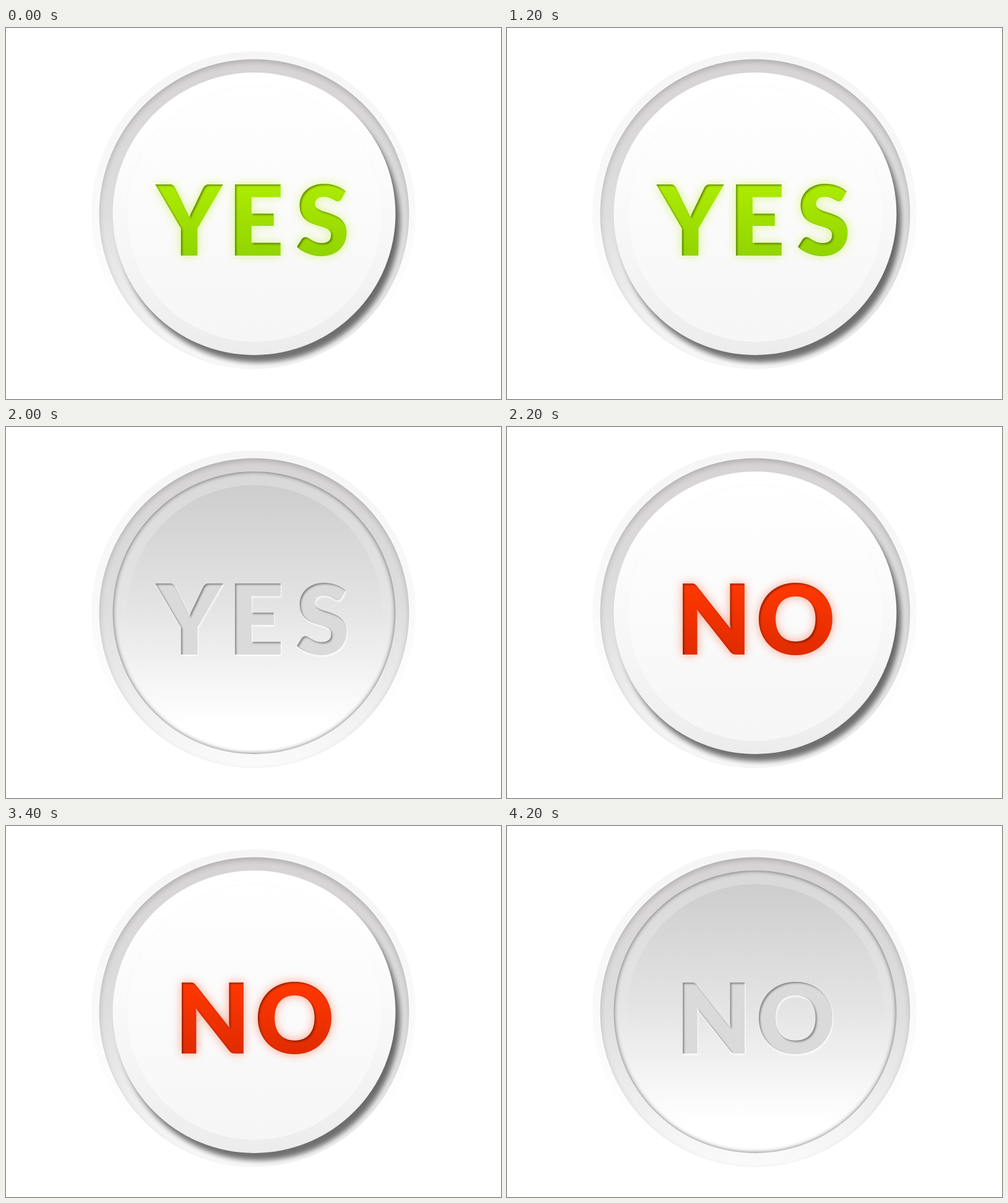
An HTML page that plays this animation: 800 px wide and 600 px high, repeating every 4400 ms.

```html
<!DOCTYPE html>
<html lang="en">
<head>
<meta charset="utf-8">
<title>Yes / No button</title>
<style>
  html, body { margin: 0; width: 100%; height: 100%; overflow: hidden; background: #fff; }
  svg { display: block; width: 100%; height: 100%; }
  text {
    font: 900 157px Lato, sans-serif;
    text-anchor: middle;
    fill: #dadada;
    filter: url(#carve) drop-shadow(1.5px 2px 1.5px #fff);
  }
  .YES:not(.pressed) text { fill: url(#green); filter: url(#carve) drop-shadow(0 0 8px #b4f00078); }
  .NO:not(.pressed) text { fill: url(#red); filter: url(#carve) drop-shadow(0 0 8px #ff360070); }
  .pressed .raised, svg:not(.pressed) .sunken { display: none; }
</style>
</head>
<body>
<svg id="button" class="YES" viewBox="0 0 800 600">
  <defs>
    <linearGradient id="halo" x2="0" y2="1">
      <stop stop-color="#f5f5f5"/><stop offset=".5" stop-color="#f9f9f9"/><stop offset=".85" stop-color="#fff"/>
    </linearGradient>
    <linearGradient id="groove" x2="0" y2="1">
      <stop stop-color="#d6d3d4"/><stop offset=".5" stop-color="#dedede"/><stop offset="1" stop-color="#fbfbfb"/>
    </linearGradient>
    <linearGradient id="rimUp" x2="0" y2="1">
      <stop offset=".15" stop-color="#fff"/><stop offset=".6" stop-color="#f7f7f7"/><stop offset="1" stop-color="#ececec"/>
    </linearGradient>
    <linearGradient id="plateUp" x2="0" y2="1">
      <stop stop-color="#fff"/><stop offset="1" stop-color="#f6f6f6"/>
    </linearGradient>
    <linearGradient id="rimDown" x2="0" y2="1">
      <stop stop-color="#d8d8d8"/><stop offset=".5" stop-color="#e6e6e6"/><stop offset=".9" stop-color="#fff"/>
    </linearGradient>
    <linearGradient id="plateDown" x2="0" y2="1">
      <stop stop-color="#cdcdcd"/><stop offset=".5" stop-color="#e5e5e5"/><stop offset=".92" stop-color="#fff"/>
    </linearGradient>
    <linearGradient id="green" gradientUnits="userSpaceOnUse" x1="0" x2="0" y1="255" y2="368">
      <stop stop-color="#aceb00"/><stop offset="1" stop-color="#92d400"/>
    </linearGradient>
    <linearGradient id="red" gradientUnits="userSpaceOnUse" x1="0" x2="0" y1="255" y2="368">
      <stop stop-color="#ff3800"/><stop offset="1" stop-color="#e02b00"/>
    </linearGradient>

    <!-- Inner shadows: the shape minus its own blurred, shifted copy. -->
    <filter id="carve" color-interpolation-filters="sRGB">
      <feOffset in="SourceAlpha" dx="1.5" dy="2"/>
      <feGaussianBlur stdDeviation="1.6" result="shifted"/>
      <feFlood flood-opacity=".4"/>
      <feComposite in2="SourceAlpha" operator="in"/>
      <feComposite in2="shifted" operator="out" result="shade"/>
      <feMerge><feMergeNode in="SourceGraphic"/><feMergeNode in="shade"/></feMerge>
    </filter>
    <filter id="sink" color-interpolation-filters="sRGB">
      <feOffset in="SourceAlpha" dy="4"/>
      <feGaussianBlur stdDeviation="4" result="shifted"/>
      <feFlood flood-opacity=".18"/>
      <feComposite in2="SourceAlpha" operator="in"/>
      <feComposite in2="shifted" operator="out" result="shade"/>
      <feMerge><feMergeNode in="SourceGraphic"/><feMergeNode in="shade"/></feMerge>
    </filter>
    <filter id="edge" color-interpolation-filters="sRGB">
      <feOffset in="SourceAlpha" dy="-.5"/>
      <feGaussianBlur stdDeviation="3.5" result="soft"/>
      <feFlood flood-opacity=".6"/>
      <feComposite in2="SourceAlpha" operator="in"/>
      <feComposite in2="soft" operator="out" result="shade"/>
      <feMerge><feMergeNode in="SourceGraphic"/><feMergeNode in="shade"/></feMerge>
    </filter>
    <filter id="blur"><feGaussianBlur stdDeviation="4.5"/></filter>
    <clipPath id="inGroove"><circle cx="401" cy="301" r="250"/></clipPath>
  </defs>

  <circle cx="400" cy="300" r="262" fill="url(#halo)"/>
  <circle cx="401" cy="301" r="251.5" fill="none" stroke="#fff" stroke-opacity=".3" stroke-width="2"/>
  <circle cx="401" cy="301" r="250.5" fill="url(#groove)" filter="url(#sink)"/>

  <g class="raised">
    <g clip-path="url(#inGroove)">
      <circle cx="408.5" cy="313" r="228" fill="#000" fill-opacity=".55" filter="url(#blur)"/>
    </g>
    <circle cx="401" cy="300.5" r="228.5" fill="url(#rimUp)"/>
    <circle cx="401.5" cy="301" r="207" fill="url(#plateUp)" stroke="#000" stroke-opacity=".025"/>
  </g>
  <g class="sunken">
    <g filter="url(#edge)">
      <circle cx="401" cy="300.5" r="228.5" fill="url(#rimDown)"/>
      <circle cx="401.5" cy="301" r="207" fill="url(#plateDown)"/>
    </g>
  </g>
  <text id="label" y="368"></text>
</svg>
<script>
  const HOLD = 2000, PRESS = 200, STEP = HOLD + PRESS;
  const words = [
    { text: "YES", x: "296 404 511.5" },
    { text: "NO", x: "334 466.5" }
  ];
  const button = document.getElementById("button");
  const label = document.getElementById("label");

  function draw(time) {
    const word = words[Math.floor(time / STEP) % words.length];
    const pressed = time % STEP >= HOLD;
    label.textContent = word.text;
    label.setAttribute("x", word.x);
    button.setAttribute("class", word.text + (pressed ? " pressed" : ""));
  }

  function tick() {
    draw(performance.now());
    requestAnimationFrame(tick);
  }
  tick();
</script>
</body>
</html>
```
